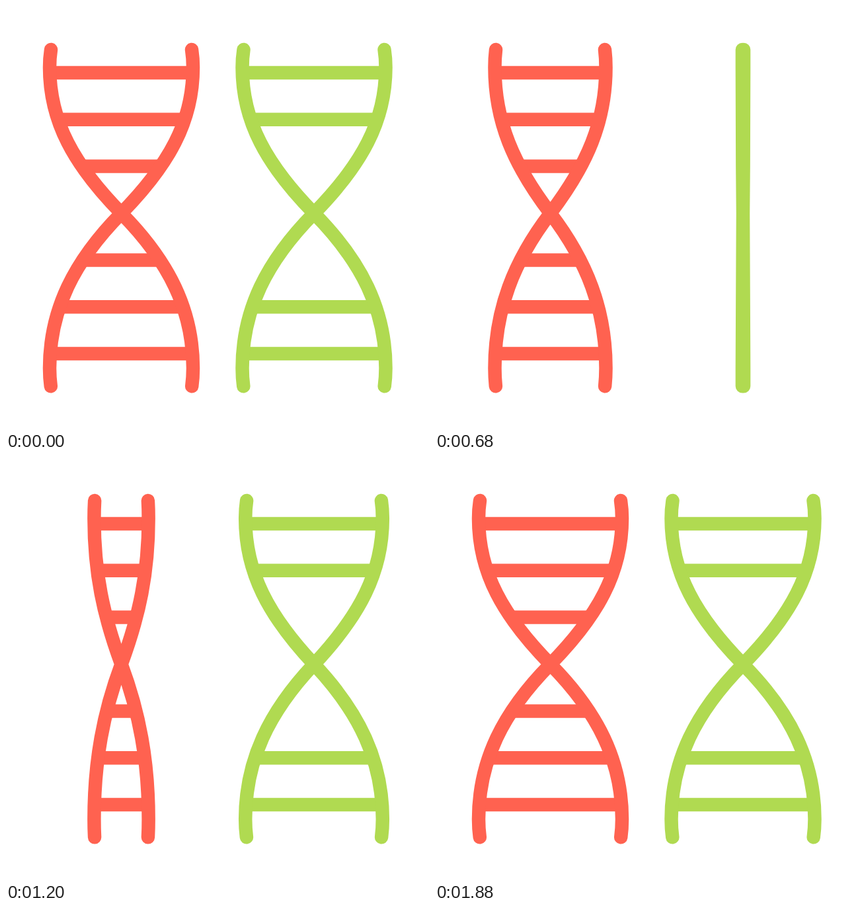
These frames come from a looping animation (640x640 px, 2 s). An HTML page:

```html
<!DOCTYPE html>
<html lang="en">
<head>
<meta charset="utf-8">
<title>Turning helices</title>
<style>
  html, body { margin: 0; width: 100%; height: 100%; overflow: hidden; background: #fff; }
  svg { display: block; width: 100%; height: 100%; }
  path { fill: none; stroke-width: 20.5; stroke-linecap: round; stroke-linejoin: round; }
  path.rungs { stroke-linecap: butt; }
</style>
</head>
<body>
<svg id="stage" viewBox="0 0 640 640"></svg>
<script>
const LOOP = 2000, STEP = 40, TURN = 800;
const MIDDLE = 313.6;
// Height and half width of each rung at full spread
const OUTER = [[101, 108], [171.8, 95], [455.3, 95], [526, 107]];
const INNER = [[242.6, 60], [384.5, 60]];

const helices = [
  { x: 174.5, color: '#ff6250', start: 80, back: -0.967, rungs: [...OUTER, ...INNER] },
  { x: 466, color: '#b0da51', start: 280, back: -1.02, rungs: OUTER }
];

const stage = document.getElementById('stage');

function addPath(color, className) {
  const path = document.createElementNS('http://www.w3.org/2000/svg', 'path');
  path.setAttribute('stroke', color);
  path.setAttribute('class', className);
  return stage.appendChild(path);
}

for (const helix of helices) {
  helix.rungPath = addPath(helix.color, 'rungs');
  helix.strandPath = addPath(helix.color, 'strands');
}

// Symmetric ease-in-out: cubic-bezier(.53, 0, .47, 1)
function ease(p) {
  if (p <= 0) return 0;
  if (p >= 1) return 1;
  let low = 0, high = 1, u;
  for (let i = 0; i < 24; i++) {
    u = (low + high) / 2;
    const v = 1 - u;
    const x = 3 * 0.53 * u * v * v + 3 * 0.47 * u * u * v + u * u * u;
    if (x < p) low = u; else high = u;
  }
  return u * u * (3 - 2 * u);
}

function spreadAt(helix, time) {
  const p = (time - helix.start) / TURN;
  return 1 + (helix.back - 1) * (ease(p) - ease(p - 1));
}

function strand(x, s) {
  const at = (dx, y) => `${(x + dx * s).toFixed(2)} ${y}`;
  return `M${at(-106.5, 66)}Q${at(-108.5, 79)} ${at(-108.5, 93)}` +
    `C${at(-108.5, 175)} ${at(-72, 240)} ${at(0, MIDDLE)}` +
    `C${at(72, 386.5)} ${at(108.5, 460)} ${at(108.5, 548)}` +
    `Q${at(108.5, 562)} ${at(106.7, 575.3)}`;
}

function draw(time) {
  for (const helix of helices) {
    const { x, rungs, rungPath, strandPath } = helix;
    const s = spreadAt(helix, time);
    strandPath.setAttribute('d', strand(x, s) + strand(x, -s));
    rungPath.setAttribute('d', rungs.map(([y, half]) =>
      `M${x - half * Math.abs(s)} ${y}H${x + half * Math.abs(s)}`).join(''));
  }
}

const origin = performance.now();
function tick() {
  const time = (performance.now() - origin) % LOOP;
  draw(Math.floor(time / STEP) * STEP);
  requestAnimationFrame(tick);
}
tick();
</script>
</body>
</html>
```
